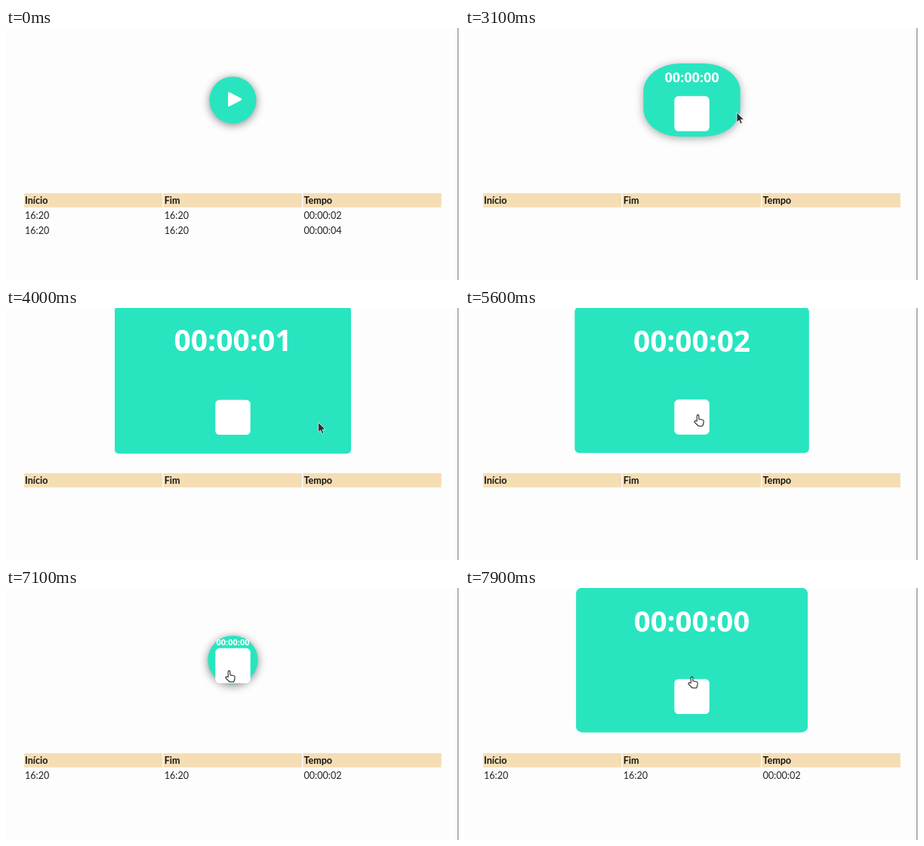
Animation of 600 by 334 pixels, one loop 8 s. Source, as an HTML page:

```html
<!DOCTYPE html>
<html lang="pt">
<head>
<meta charset="utf-8">
<title>Cronômetro</title>
<style>
  html, body { margin: 0; width: 100%; height: 100%; overflow: hidden; background: #fefdfe; }
  svg { display: block; width: 600px; height: 334px; }
  .table { font: 12.6px Lato, sans-serif; fill: #222; }
  .head { font-weight: 700; fill: #151515; }
  #clock { font-family: "Open Sans", "Noto Sans", sans-serif; font-weight: 700; fill: #fff; text-anchor: middle; }
</style>
</head>
<body>
<svg viewBox="0 0 600 334">
  <rect width="600" height="334" fill="#fefdfe"/>
  <rect x="598" width="1" height="334" fill="#8c8f8c"/>
  <rect x="599" width="1" height="334" fill="#dfe2df"/>
  <g id="table" class="table"></g>
  <rect id="panel" fill="#28e5c0"/>
  <path id="play" d="M-7.5-8L7.8 0L-7.5 8Z" fill="#fff" stroke="#fff" stroke-width="3" stroke-linejoin="round"/>
  <g id="running">
    <text id="clock" x="300.5"></text>
    <rect id="stop" x="277.3" width="46.4" height="46.4" rx="5.5" fill="#fff"/>
  </g>
  <path id="arrow" d="M0 0V13L3 10.3L5 15L7.2 14L5.2 9.4H9.3Z" fill="#2c2c30" stroke="#fff" stroke-width=".7"/>
  <path id="hand" d="M4.2 9V1.9a1.3 1.3 0 0 1 2.6 0V6.2l4.9 1q1.7.4 1.5 2.2l-.7 3.9-1 2.2H6.300L1 10.300q-.6-1.700 1.200-1.800z"
    fill="#fff" stroke="#26262a" stroke-width="1.1" stroke-linejoin="round"/>
</svg>
<script>
const LOOP = 8000, STEP = 100;
const $ = id => document.getElementById(id);
const set = (el, attrs) => { for (const k in attrs) el.setAttribute(k, attrs[k]); };
const show = (el, on) => { el.style.display = on ? '' : 'none'; };

function add(parent, tag, attrs, text = '') {
  const el = document.createElementNS('http://www.w3.org/2000/svg', tag);
  set(el, attrs);
  el.textContent = text;
  return parent.appendChild(el);
}

// Table: one header and up to two rows
const columns = [24, 208.7, 393.4];
['Início', 'Fim', 'Tempo'].forEach((label, i) => {
  add($('table'), 'rect', { x: columns[i], y: 219, width: 183.300, height: 18.7, fill: '#f5ddb4' });
  add($('table'), 'text', { x: columns[i] + 1, y: 232.5, class: 'head' }, label);
});
const rows = ['00:00:02', '00:00:04'].map((time, r) => {
  const row = add($('table'), 'g', {});
  ['16:20', '16:20', time].forEach((text, i) =>
    add(row, 'text', { x: columns[i] + 1, y: 252.5 + 20 * r }, text));
  return row;
});

// The standard CSS "ease" curve, solved by bisection
function ease(x) {
  if (x <= 0) return 0;
  if (x >= 1) return 1;
  const bezier = (a, b, u) => 3 * a * u * (1 - u) ** 2 + 3 * b * u * u * (1 - u) + u ** 3;
  let lo = 0, hi = 1;
  for (let i = 0; i < 24; i++) {
    const mid = (lo + hi) / 2;
    if (bezier(.25, .25, mid) < x) lo = mid; else hi = mid;
  }
  return bezier(.1, 1, lo);
}

const phase = (t, start, duration) => ease((t - start) / duration);
const openness = t =>
  phase(t, 2910, 1020) - phase(t, 5578, 1090) + phase(t, 7068, 1040);

// Pointer visits: time, x, y
const visits = [
  { kind: 'arrow', end: 1100, path: [[300, 554, 130], [500, 300, 236], [700, 28, 257], [800, 80, 230], [1000, 210, 68]] },
  { kind: 'arrow', end: 2400, path: [[1900, 494, 154], [2100, 300, 88], [2200, 234, 76], [2300, 207, 74]] },
  { kind: 'hand', end: 3100, path: [[2400, 274, 86], [2500, 296, 96]] },
  { kind: 'arrow', end: 4200, path: [[3100, 360, 112], [3300, 540, 160], [3400, 571, 168], [3700, 570, 168], [3800, 561, 165], [4100, 340, 145]] },
  { kind: 'hand', end: LOOP, path: [[4200, 318, 143], [4400, 306, 142], [4800, 305, 142], [5100, 303, 141], [6400, 303, 141], [6800, 290, 109], [7100, 290, 109], [7900, 295, 117]] }
];

function along(path, t) {
  const i = path.findIndex(p => p[0] > t);
  if (i < 0) return path[path.length - 1].slice(1);
  const [a, b] = [path[i - 1], path[i]];
  const k = (t - a[0]) / (b[0] - a[0]);
  return [a[1] + (b[1] - a[1]) * k, a[2] + (b[2] - a[2]) * k];
}

function drawPointer(t) {
  const visit = visits.find(v => t >= v.path[0][0] && t < v.end);
  for (const kind of ['arrow', 'hand']) {
    const on = !!visit && visit.kind === kind;
    show($(kind), on);
    if (on) set($(kind), { transform: `translate(${along(visit.path, t)})` });
  }
}

function drawPanel(t) {
  const p = openness(t), w = 62 + 251 * p, h = 62 + 133 * p;
  const top = 95.5 - h / 2;
  const radius = side => side * .5 * (1 - p) + 5 * p;
  set($('panel'), { x: 300.5 - w / 2, y: top, width: w, height: h, rx: radius(w), ry: radius(h) });
  $('panel').style.filter = `drop-shadow(0 2px 6px rgba(0,0,0,${.48 * (1 - p)}))`;

  const running = t >= 2910 && t < 5700 || t >= 7068;
  show($('running'), running);
  show($('play'), !running);
  set($('play'), { transform: `translate(303 ${94.5 - 7 * p})` });
  set($('stop'), { y: 79.1 + 42.6 * p });

  const size = 10.5 + 28.6 * p;
  set($('clock'), { y: top + 8.5 + 37 * p + size * .357, 'font-size': size });
  const seconds = t < 5700 ? Math.max(0, Math.floor((t - 2900) / 1000)) : 0;
  $('clock').textContent = '00:00:0' + seconds;
}

function draw(t) {
  const rowCount = t < 1600 ? 2 : t < 5700 ? 0 : 1;
  rows.forEach((row, i) => show(row, i < rowCount));
  drawPanel(t);
  drawPointer(t);
}

const start = performance.now();
function tick() {
  const t = (performance.now() - start) % LOOP;
  draw(Math.floor(t / STEP) * STEP);
  requestAnimationFrame(tick);
}
tick();
</script>
</body>
</html>
```
